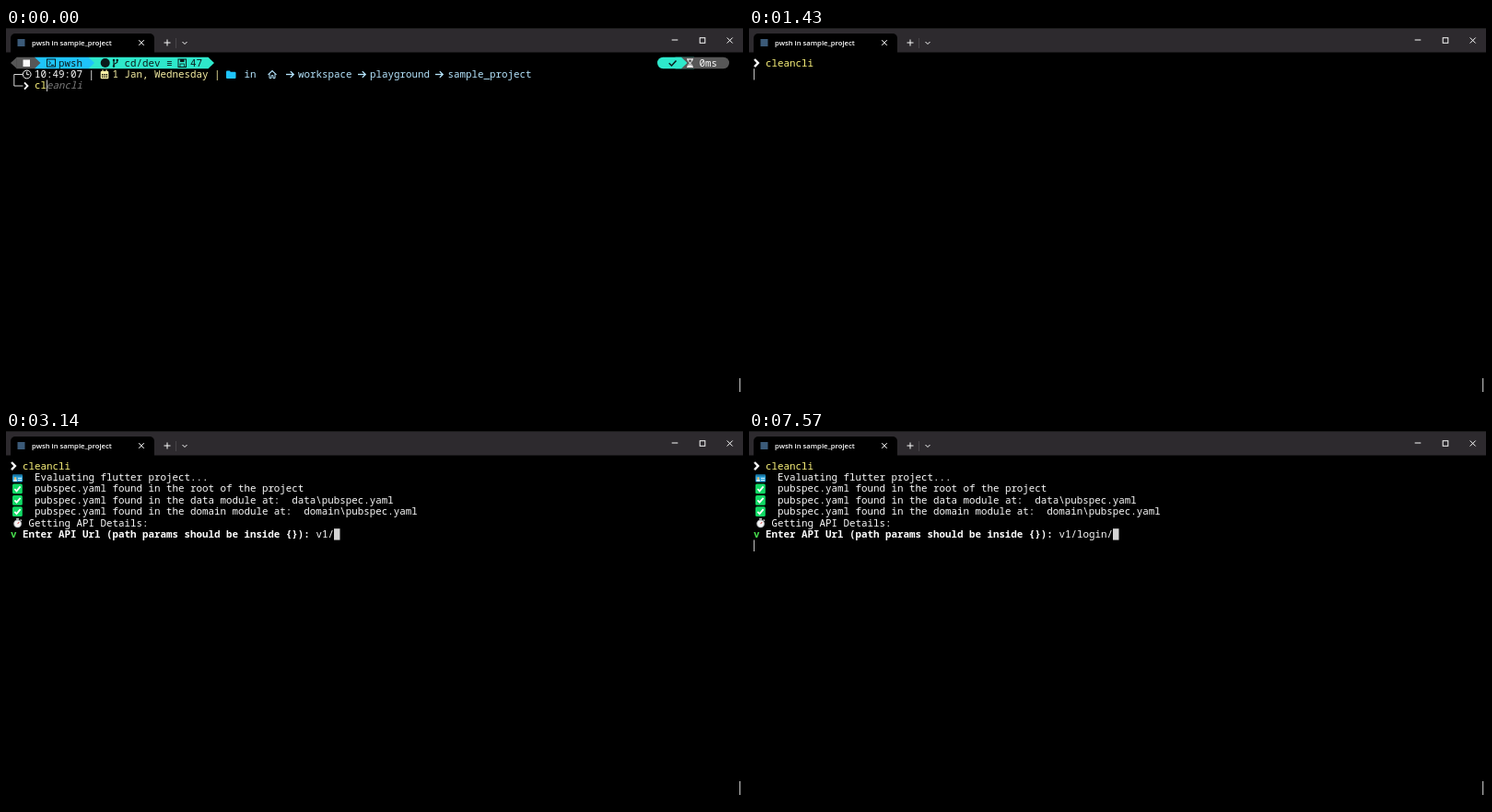
Recreate the animation shown at these times as an HTML page with a canvas. Size 800 by 408 pixels, loop 8000 ms.

```html
<!DOCTYPE html>
<html lang="en">
<head>
<meta charset="utf-8">
<title>Terminal session</title>
<style>
  html, body { margin: 0; width: 100%; height: 100%; overflow: hidden; background: #000; }
  canvas { display: block; }
</style>
</head>
<body>
<canvas id="stage" width="800" height="408"></canvas>
<script>
const ctx = document.getElementById('stage').getContext('2d');
const LOOP = 8000;
const CELL = 6.5, ROW = 12.4, LEFT = 5, TOP = 31.8;
const FACE = '10.833px "Noto Sans Mono", monospace';
const MONO = '500 ' + FACE, BOLD = 'bold ' + FACE, ITALIC = 'italic ' + FACE;
const WHITE = '#fafafa', YELLOW = '#f9f17a', SKY = '#b6e6ff', CREAM = '#f9f1a5';
const GRAY = '#575757', BLUE = '#1fc4fb', TEAL = '#2ee8cb', INK = '#0b1c1c';

const colX = col => LEFT + col * CELL;
const rowY = row => TOP + row * ROW;

function text(str, col, row, color = WHITE, font = MONO) {
  ctx.font = font;
  ctx.fillStyle = color;
  ctx.fillText(str, colX(col), rowY(row) + 9.7);
}

function rect(x, y, w, h, color, radius = 0) {
  ctx.fillStyle = color;
  ctx.beginPath();
  ctx.roundRect(x, y, w, h, radius);
  ctx.fill();
}

function poly(points, color) {
  ctx.fillStyle = color;
  ctx.beginPath();
  points.forEach(([x, y]) => ctx.lineTo(x, y));
  ctx.fill();
}

function line(points, color = WHITE, width = 1) {
  ctx.strokeStyle = color;
  ctx.lineWidth = width;
  ctx.beginPath();
  points.forEach(([x, y]) => ctx.lineTo(x, y));
  ctx.stroke();
}

function disc(x, y, r, color) {
  ctx.fillStyle = color;
  ctx.beginPath();
  ctx.arc(x, y, r, 0, 7);
  ctx.fill();
}

function ring(x, y, r, color, width = 1) {
  ctx.strokeStyle = color;
  ctx.lineWidth = width;
  ctx.beginPath();
  ctx.arc(x, y, r, 0, 7);
  ctx.stroke();
}

function box(x, y, w, h, color, width = 1) {
  ctx.strokeStyle = color;
  ctx.lineWidth = width;
  ctx.strokeRect(x, y, w, h);
}

function cross(x, y, r) {
  line([[x - r, y - r], [x + r, y + r]]);
  line([[x - r, y + r], [x + r, y - r]]);
}

function drawWindow() {
  rect(0, 0, 800, 408, '#000');
  rect(0, 0, 800, 26.5, '#2d2a2e');
  rect(0, 0, 800, 1, '#1c1c1c');
  rect(5, 6, 156, 21, '#000', [5, 5, 0, 0]);
  rect(12.5, 12, 8, 8, '#3b5a78');
  ctx.font = '600 7.7px "Open Sans", sans-serif';
  ctx.fillStyle = '#fff';
  ctx.fillText('pwsh in sample_project', 28, 19);
  cross(147, 16, 2.8);
  line([[171.5, 16], [178.5, 16]]);
  line([[175, 12.5], [175, 19.5]]);
  line([[184.5, 11], [184.5, 22]], '#484549');
  line([[191.5, 15], [194, 17.5], [196.5, 15]]);
  line([[722.7, 13], [729.3, 13]]);
  box(753.2, 10.7, 5.6, 5.6, WHITE);
  cross(785.7, 13.5, 3);
  line([[796.7, 381], [796.7, 396]], '#c8c8c8', 1.1);
}

// Right-pointing powerline segment; its tip fills the column after the last one.
function segment(from, to, color) {
  const top = TOP, bottom = TOP + ROW;
  poly([[colX(from), top], [colX(to), top], [colX(to + 1), TOP + ROW / 2],
    [colX(to), bottom], [colX(from), bottom]], color);
}

function drawStatusBar() {
  const mid = TOP + ROW / 2;
  segment(13, 33, TEAL);
  segment(4, 13, BLUE);
  segment(1, 4, GRAY);
  poly([[colX(0), mid], [colX(1) + .3, TOP], [colX(1) + .3, TOP + ROW]], GRAY);
  rect(18.5, 34.5, 7.5, 7.5, WHITE);

  box(44.5, 34, 9, 8, INK);
  line([[46.3, 36], [48.5, 38], [46.3, 40]], INK);
  line([[49, 40.3], [52, 40.3]], INK);
  text('pwsh', 8, 0, INK);

  disc(107.7, mid, 5, INK);
  line([[117, 35], [117, 42]], INK, 1.2);
  line([[120.7, 35], [120.7, 37.5], [117, 39.5]], INK, 1.2);
  disc(117, 35, 1.2, INK);
  disc(120.7, 35, 1.2, INK);
  disc(117, 41.5, 1.2, INK);
  text('cd/dev ≡', 19, 0, INK);
  box(187, 34, 8.5, 8.5, INK);
  rect(189, 34, 4.5, 3, INK);
  box(189, 39, 4.5, 3.5, INK, .8);
  text('47', 30, 0, INK);

  rect(colX(108), TOP, 40, ROW, TEAL, [6.2, 0, 0, 6.2]);
  rect(colX(112), TOP, colX(120) - colX(112), ROW, GRAY, [0, 6.2, 6.2, 0]);
  segment(111, 112, TEAL);
  line([[719.7, 38.2], [722.5, 41], [727.5, 35.5]], INK, 1.5);
  line([[739, 34], [746, 34]], WHITE, 1.2);
  line([[739, 42.3], [746, 42.3]], WHITE, 1.2);
  line([[740.3, 34], [740.3, 36], [744.7, 40.3], [744.7, 42.3]]);
  line([[744.7, 34], [744.7, 36], [740.3, 40.3], [740.3, 42.3]]);
  poly([[740.5, 42], [742.5, 39.3], [744.5, 42]], WHITE);
  text('0ms', 115, 0);
}

function arrow(x) {
  const y = 50.5;
  line([[x - 4, y], [x + 4, y]], SKY, 1.3);
  line([[x + .8, y - 3.4], [x + 4.2, y], [x + .8, y + 3.4]], SKY, 1.3);
}

function drawInfoRow() {
  ring(22.7, 50.5, 4.4, WHITE);
  line([[22.7, 47.5], [22.7, 50.7], [25.2, 50.7]]);
  text('10:49:07 |', 4, 1);

  rect(102.7, 47, 8.6, 8.3, CREAM, 1);
  line([[105, 45.5], [105, 48]], CREAM, 1.3);
  line([[109, 45.5], [109, 48]], CREAM, 1.3);
  for (let i = 0; i < 6; i++) rect(104 + i % 3 * 2.3, 50 + (i > 2) * 2.4, 1.4, 1.4, '#000');
  text('1 Jan, Wednesday |', 17, 1, CREAM);

  rect(239, 46.5, 4.5, 3, BLUE, 1);
  rect(239, 47.7, 10.5, 7.3, BLUE, 1);
  text('in', 39, 1, SKY);
  line([[284.5, 50.8], [289, 46.6], [293.5, 50.8]], SKY, 1.1);
  line([[286, 50], [286, 54.6], [288, 54.6], [288, 51.7], [290, 51.7],
    [290, 54.6], [292, 54.6], [292, 50]], SKY);
  [308, 386, 470].forEach(arrow);
  text('workspace', 48, 1, SKY);
  text('playground', 60, 1, SKY);
  text('sample_project', 73, 1, SKY);
}

function chevron(x, y, size, width) {
  line([[x, y - size], [x + size * .95, y], [x, y + size]], WHITE, width);
}

function bar(col, row) {
  rect(colX(col), rowY(row), 1, ROW, '#c4c4c4');
}

function drawPrompt(time) {
  drawStatusBar();
  drawInfoRow();
  line([[18, 50.5], [8.8, 50.5], [8.8, 63], [18.5, 63]], '#d8d8d8');
  chevron(20, 63, 3.6, 1.9);
  const command = 'cleancli';
  const typed = 2 + [140, 290, 430, 570, 710, 860].filter(t => time >= t).length;
  text(command.slice(0, typed), 4, 2, YELLOW);
  text(command.slice(typed) || '.exe', 4 + typed, 2, '#7c7c7c', ITALIC);
  bar(4 + typed, 2);
}

function idCard(row) {
  const y = rowY(row) + 3.4;
  rect(7, y, 11, 7.8, '#2aa4dc', 1);
  rect(7, y, 11, 1.8, '#1878a8', 1);
  disc(10, y + 4, 1.3, '#f0c070');
  rect(8.2, y + 5.3, 3.6, 1.8, '#f4f4f4');
  rect(13, y + 3.3, 4, 1, '#e8f6ff');
  rect(13, y + 5.5, 4, 1, '#e8f6ff');
}

function checkBox(row) {
  const y = rowY(row);
  rect(7, y + .9, 10.8, 10.8, '#10d964', 1.5);
  line([[9.3, y + 6.4], [11.5, y + 8.7], [15.6, y + 3.8]], '#fff', 1.8);
}

function stopwatch(row) {
  const y = rowY(row) + 7;
  rect(11.1, y - 5.8, 3, 1.6, '#c8c8c8');
  line([[15.6, y - 4.4], [16.9, y - 3.1]], '#c8c8c8', 1.4);
  disc(12.6, y, 4.4, '#b8bcc0');
  disc(12.6, y, 3.4, '#f5f5f5');
  line([[12.6, y + .3], [14.2, y - 1.8]], '#d04040', 1);
}

function question(row, time) {
  const typed = [4430, 4570, 4860, 5140, 5290, 7570].filter(t => time >= t).length;
  const answer = 'v1/' + 'login/'.slice(0, typed);
  text('v', 0, row, '#48e04e', BOLD);
  text('Enter API Url (path params should be inside {}):', 2, row, '#fff', BOLD);
  text(answer, 51, row);
  rect(colX(51 + answer.length), rowY(row), CELL, ROW, '#d4d4d4');
}

const checked = str => row => { checkBox(row); text(str, 4, row); };

const output = [
  [1430, row => { chevron(6, rowY(row) + 6.3, 4.1, 2.4); text('cleancli', 2, row, YELLOW); }],
  [1570, row => { idCard(row); text('Evaluating flutter project...', 4, row); }],
  [1710, checked('pubspec.yaml found in the root of the project')],
  [2000, checked('pubspec.yaml found in the data module at:  data\\pubspec.yaml')],
  [2140, checked('pubspec.yaml found in the domain module at:  domain\\pubspec.yaml')],
  [2290, row => { stopwatch(row); text('Getting API Details:', 3, row); }],
  [2290, question],
];

const cursorToggles = [3000, 3570, 4000, 4290, 6140, 6710];

function drawOutput(time) {
  const lines = output.filter(([start]) => time >= start);
  lines.forEach(([, draw], row) => draw(row, time));
  const toggles = cursorToggles.filter(t => time >= t).length;
  if (toggles % 2 === 0) bar(0, lines.length);
}

const startTime = performance.now();

function frame() {
  const time = (performance.now() - startTime) % LOOP;
  drawWindow();
  if (time < output[0][0]) drawPrompt(time);
  else drawOutput(time);
  requestAnimationFrame(frame);
}
frame();
</script>
</body>
</html>
```
